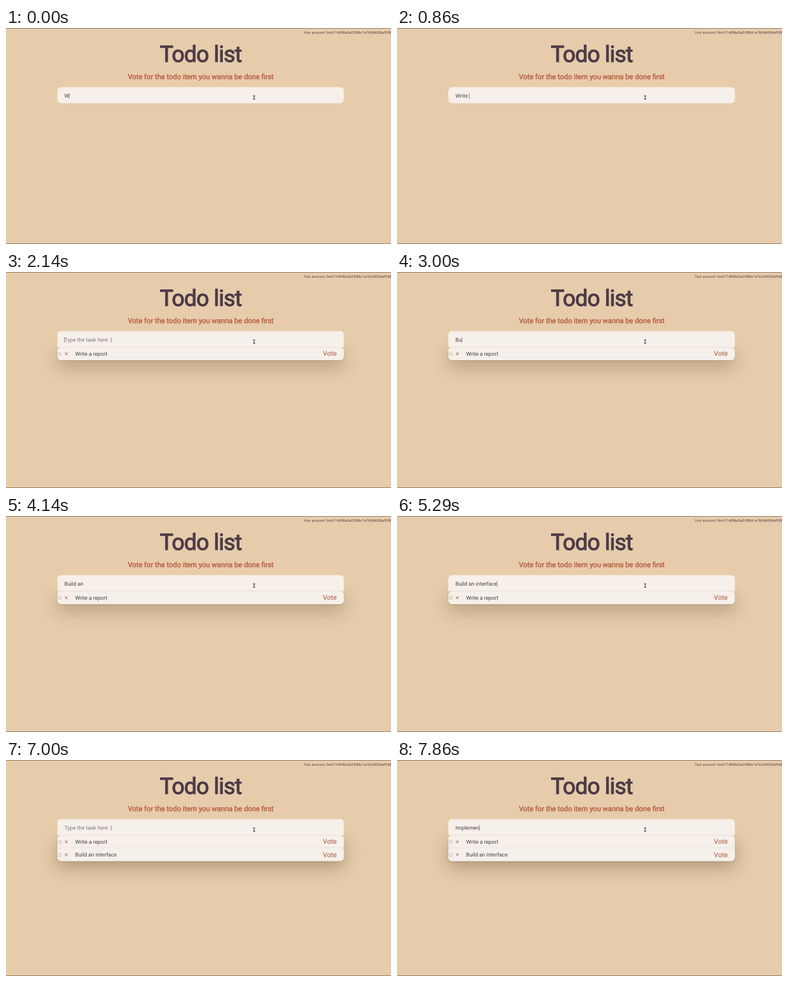
Write an HTML page with a canvas that moves like this. It is 600x338 px and loops after 8000 ms.

```html
<!DOCTYPE html>
<html lang="en">
<head>
<meta charset="utf-8">
<title>Todo list</title>
<style>
html, body { margin: 0; width: 100%; height: 100%; overflow: hidden; background: #e6ccab; }
canvas { display: block; width: 600px; height: 338px; }
</style>
</head>
<body>
<canvas id="stage" width="600" height="338"></canvas>
<script>
const ctx = document.getElementById('stage').getContext('2d');
const LOOP = 8000, FPS = 7, BLINK = 500;
const LEFT = 80, WIDTH = 446.5, FIELD_TOP = 92.4, LIST_TOP = 117.8, ROW = 20.3, RADIUS = 6;
const INK = '#45403e', RUST = '#a9553e', PAPER = '#f6f0ea';

// Each task is typed in bursts of steady speed, then added to the list.
const TASKS = [
  { added: 2100, bursts: [
    { text: 'Write a ', start: 0, end: 1140 },
    { text: 'report', start: 1150, end: 1490 }] },
  { added: 5420, bursts: [
    { text: 'Build an ', start: 2850, end: 3640 },
    { text: 'interface', start: 4280, end: 5130 }] },
  { added: Infinity, bursts: [
    { text: 'Implement', start: 7130, end: 7950 }] }
];

const nameOf = task => task.bursts.map(b => b.text).join('');

function typedPart({ text, start, end }, t) {
  if (t < start) return '';
  const progress = Math.min(1, (t - start) / (end - start));
  return text.slice(0, 1 + Math.floor((text.length - 1) * progress));
}

function caretVisible(t) {
  const keys = TASKS.flatMap(({ added, bursts }) => [
    added, ...bursts.map(b => (t < b.start ? Infinity : Math.min(t, b.end)))
  ]);
  const lastKey = Math.max(...keys.filter(time => time <= t));
  return (t - lastKey) % (2 * BLINK) < BLINK;
}

function text(str, x, y, size, color, { align = 'left', bold = 0, tracking = 0 } = {}) {
  ctx.font = `${size}px Roboto, sans-serif`;
  ctx.letterSpacing = `${tracking * size}px`;
  ctx.textAlign = align;
  ctx.fillStyle = color;
  ctx.fillText(str, x, y);
  if (bold) {
    ctx.strokeStyle = color;
    ctx.lineWidth = bold;
    ctx.lineJoin = 'round';
    ctx.strokeText(str, x, y);
  }
}

function card(y, h, radius = RADIUS) {
  ctx.fillStyle = PAPER;
  ctx.beginPath();
  ctx.roundRect(LEFT, y, WIDTH, h, radius);
  ctx.fill();
}

function withShadow(color, blur, dy, paint) {
  ctx.save();
  ctx.shadowColor = color;
  ctx.shadowBlur = blur;
  ctx.shadowOffsetY = dy;
  paint();
  ctx.restore();
}

function line(color, width, ...segments) {
  ctx.strokeStyle = color;
  ctx.lineWidth = width;
  ctx.beginPath();
  for (const [x1, y1, x2, y2] of segments) {
    ctx.moveTo(x1, y1);
    ctx.lineTo(x2, y2);
  }
  ctx.stroke();
}

function drawItem(task, i) {
  const y = LIST_TOP + i * ROW, mid = y + 10.2;
  withShadow('rgba(70,45,25,.2)', 3, 0.6, () => card(y, ROW - 0.2));
  ctx.strokeStyle = '#a29b96';
  ctx.lineWidth = 0.6;
  ctx.beginPath();
  ctx.roundRect(81.6, mid - 2, 4.4, 4.4, 1.2);
  ctx.stroke();
  line(RUST, 0.9, [91.9, mid - 2.2, 96.1, mid + 2], [96.1, mid - 2.2, 91.9, mid + 2]);
  text(nameOf(task), 107.7, mid + 2.8, 8.33, INK);
  text('Vote', 515.2, mid + 3.4, 10.5, RUST, { align: 'right' });
}

function drawField(task, t) {
  const typed = task.bursts.map(b => typedPart(b, t)).join('');
  text(typed || 'Type the task here :)', 91, 109, 8.33, typed ? INK : '#7d7875');
  if (caretVisible(t)) {
    const x = 91.3 + ctx.measureText(typed).width;
    line('#55504d', 0.6, [x, 101.8, x, 110.6]);
  }
}

function drawPointer() {
  line('#3c3735', 1, [386.7, 106.2, 386.7, 111.3],
    [385, 106.2, 388.4, 106.2], [385, 111.4, 388.4, 111.4]);
}

function draw(t) {
  ctx.textRendering = 'geometricPrecision';
  ctx.fillStyle = '#e6ccab';
  ctx.fillRect(0, 0, 600, 338);
  line('#94816f', 1, [0, 0.5, 600, 0.5], [0, 337.5, 600, 337.5]);

  text('Your account: 0x4c71d09be5a23f86c1e7b2d4056af938', 464, 8.8, 5.5, '#554547');
  text('Todo list', 303.5, 52.8, 35.3, '#4d3b47', { align: 'center', bold: 1.1, tracking: -0.025 });
  text('Vote for the todo item you wanna be done first', 303.6, 80.3, 11.08, '#b95b40',
    { align: 'center', bold: 0.4 });

  const listed = TASKS.filter(task => task.added <= t);
  const count = listed.length;
  if (count) {
    withShadow('rgba(50,32,14,.3)', 27, 10, () => card(LIST_TOP, count * ROW - 0.2));
  }
  card(FIELD_TOP, LIST_TOP - FIELD_TOP, count ? [RADIUS, RADIUS, 0, 0] : RADIUS);
  listed.forEach(drawItem);
  drawField(TASKS[count], t);
  drawPointer();
}

function tick() {
  const frame = Math.floor((performance.now() % LOOP + 6) * FPS / 1000);
  draw(frame * 1000 / FPS % LOOP);
  requestAnimationFrame(tick);
}
tick();
</script>
</body>
</html>
```
